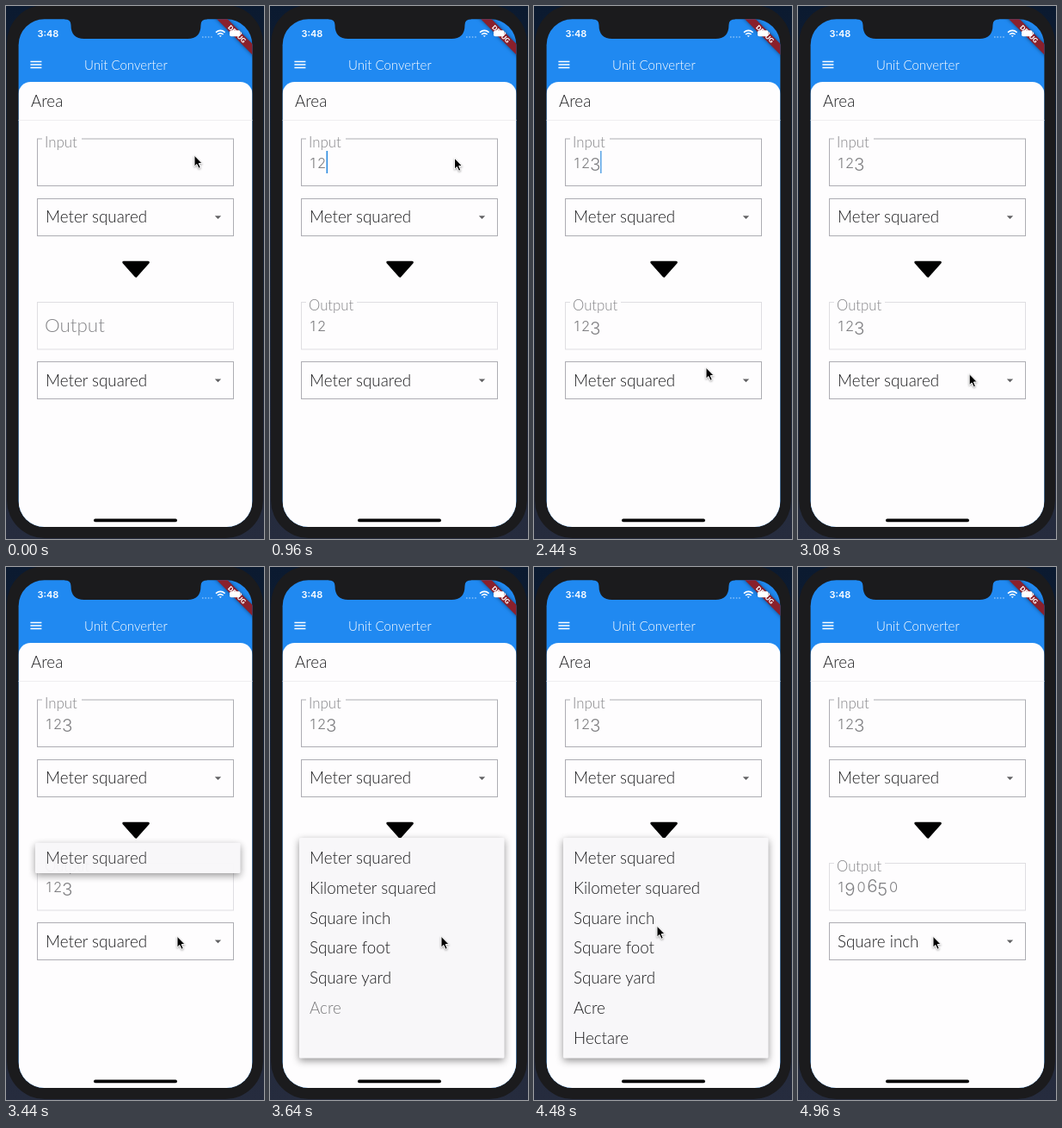
An HTML page for the animation above (5000 ms loop, 300 px wide and 618 px high).

```html
<!DOCTYPE html>
<html lang="en">
<head>
<meta charset="utf-8">
<title>Unit Converter</title>
<style>
  html, body { margin: 0; width: 100%; height: 100%; overflow: hidden; background: #0b1a30; }
  svg { display: block; }
  text { font-family: Lato, "Open Sans", sans-serif; font-weight: 300; white-space: pre; }
  .body { font-size: 18.8px; fill: #1c1c1e; }
  .label { font-size: 16.8px; fill: #858588; }
  .digits { font-family: Inter, sans-serif; fill: #808083; text-anchor: middle; }
  .box { fill: none; stroke: #adadb3; }
  .drop { fill: #626264; }
  #menu { filter: drop-shadow(0 3px 4px rgba(0, 0, 0, .42)); }
</style>
</head>
<body>
<svg width="300" height="618" viewBox="0 0 300 618">
  <defs>
    <clipPath id="screen"><rect x="14.6" y="15.2" width="271.8" height="588.8" rx="30"/></clipPath>
    <linearGradient id="desk" x2="0" y2="1">
      <stop stop-color="#0b1a30"/><stop offset="1" stop-color="#262c3e"/>
    </linearGradient>
  </defs>
  <rect width="300" height="618" fill="url(#desk)"/>
  <rect x="1" y="-1" width="298" height="618" rx="44" fill="#1b1b1d"/>

  <g clip-path="url(#screen)">
    <rect x="14" y="15" width="273" height="589" fill="#2089f1"/>
    <rect x="14.6" y="88" width="271.8" height="540" rx="14" fill="#fefdfe"/>
    <path d="M14 132.5H287" stroke="#efeef0"/>
    <path d="M28.4 64.4h13M28.4 68h13M28.4 71.6h13" stroke="#fff" stroke-width="1.5"/>
    <text x="91" y="73.5" font-size="15" fill="#fff">Unit Converter</text>
    <text class="body" x="29" y="117">Area</text>

    <rect class="box" x="36.5" y="154" width="228" height="54.5"/>
    <rect x="42" y="150" width="46" height="8" fill="#fefdfe"/>
    <text class="label" x="45" y="163.5">Input</text>
    <text class="digits" id="input"></text>
    <rect id="caret" y="168" width="1.6" height="26" fill="#2c8be0"/>

    <rect class="box" x="36.5" y="223.5" width="228" height="43"/>
    <text class="body" x="46" y="251">Meter squared</text>
    <path class="drop" d="M242.8 243.3h7.4l-3.7 3.7z"/>

    <path d="M136.8 297.2h28.6l-14.3 16z" stroke="#000" stroke-width="3" stroke-linejoin="round"/>

    <rect class="box" x="36.5" y="343.5" width="228" height="54.5" style="stroke:#dfdee2"/>
    <rect id="gap" x="42" y="340" height="8" fill="#fefdfe"/>
    <text class="label" id="outLabel" x="45">Output</text>
    <text class="digits" id="output"></text>

    <rect class="box" x="36.5" y="412.5" width="228" height="43"/>
    <text class="body" id="unit" x="46" y="440.5"></text>
    <path class="drop" d="M242.8 432.5h7.4l-3.7 3.7z"/>

    <g id="menu">
      <rect id="panel" x="34" width="238.5" rx="1.5" fill="#f8f7f9"/>
      <g id="items"></g>
    </g>

    <rect x="102" y="594.6" width="97" height="3.6" rx="1.8"/>

    <path d="M235 5L296 66V53.6L247.4 5z" fill="#8a202c" style="filter:drop-shadow(0 0 2px rgba(0,0,0,.5))"/>
    <text transform="translate(268.6 32.4) rotate(45)" y="2.7" font-size="7.4" style="font-weight:900"
      fill="#fff" text-anchor="middle">DEBUG</text>
    <rect x="260" y="28.2" width="12.6" height="7" rx="2" fill="#fff"/>
    <path d="M273.6 30.4v2.6" stroke="#fff"/>
  </g>

  <path d="M68 14V15.2Q75.5 15.2 75.5 22Q75.5 38 91 38H211Q226.5 38 226.5 22Q226.5 15.2 234 15.2V14z" fill="#1b1b1d"/>
  <text x="36.5" y="36.2" style="font:600 11px Inter,sans-serif" fill="#fff">3:48</text>
  <path d="M228 36h12" stroke="#fff" stroke-opacity=".45" stroke-width="1.5" stroke-dasharray="1.6 1.8"/>
  <g fill="none" stroke="#fff" stroke-width="1.6">
    <path d="M244 30.6Q249.3 26.2 254.6 30.6M246 33Q249.3 30.2 252.6 33"/>
    <path d="M247.7 34.2h3.2l-1.6 1.7z" fill="#fff" stroke="none"/>
  </g>

  <path id="mouse" d="M0-.8V12.2l2.9-2.7 2.2 4.8 2.2-1-2.1-4.7H9.2z" stroke="#fff"
    style="filter:drop-shadow(0 1px 1px rgba(0,0,0,.35))"/>
</svg>
<script>
const $ = id => document.getElementById(id);
const set = (el, attrs) => { for (const k in attrs) el.setAttribute(k, attrs[k]); };
const clamp = v => Math.min(1, Math.max(0, v));
const ramp = (t, from, length) => clamp((t - from) / length);
const ease = p => p * p * (3 - 2 * p);
const mix = (a, b, p) => a + (b - a) * p;

const LOOP = 5000, OPEN = 3370, PICK = 4520, MENU_MS = 300;
const KEYS = [560, 880, 1320];
const UNITS = ['Meter squared', 'Kilometer squared', 'Square inch', 'Square foot', 'Square yard', 'Acre', 'Hectare'];
const ADVANCE = { 0: 14, 1: 9.5, 2: 11, 3: 11.5, 5: 11.5, 6: 12, 9: 12 };

// Pointer stops: time, x, y
const POINTER = [
  [0, 219, 174], [520, 219, 174], [900, 214.5, 177], [1640, 214.5, 177], [1800, 216, 181.5], [1860, 216, 181.5],
  [2150, 200, 420], [2760, 200, 420], [3200, 199, 429], [3880, 199, 429], [4060, 143, 417],
  [4600, 143, 417], [4840, 157, 429], [LOOP, 157, 429]
];

const items = UNITS.map((name, i) => {
  const el = document.createElementNS('http://www.w3.org/2000/svg', 'text');
  el.textContent = name;
  set(el, { class: 'body', x: 46, y: 344 + 34.75 * i });
  $('items').append(el);
  return el;
});

// Old-style figures: 0-2 at x-height, 3, 5 and 9 hanging below the baseline
function writeDigits(el, digits, base) {
  let x = 45;
  const spans = [...digits].map(d => {
    const y = base + ('359'.includes(d) ? 3.6 : 0);
    const size = d < 3 ? 16.5 : 20.5;
    const span = `<tspan x="${x + ADVANCE[d] / 2}" y="${y}" font-size="${size}">${d}</tspan>`;
    x += ADVANCE[d];
    return span;
  });
  if (el.dataset.value !== digits) {
    el.dataset.value = digits;
    el.innerHTML = spans.join('');
  }
  return x;
}

function caretOpacity(t) {
  if (t < 320 || t >= OPEN) return 0;
  const fade = 1 - (1 - ramp((t - 320) % 500, 0, 250)) ** 2;
  if (t < 500) return fade;
  if (t < 1820) return 1;
  return Math.floor((t - 320) / 500) % 2 ? 1 - fade : fade;
}

function drawMenu(t) {
  const p = ramp(t, OPEN, MENU_MS);
  const opacity = clamp(p / .25) * (1 - ramp(t, PICK, 75));
  const grow = ease(ramp(p, .25, .25));
  const top = mix(319.8, 314, grow), bottom = mix(355, 569.5, grow);
  $('menu').style.opacity = opacity;
  set($('panel'), { y: top, height: bottom - top });
  const step = .5 / (UNITS.length + 1.5);
  items.forEach((el, i) => set(el, { opacity: i ? ramp(p, .5 + (i + 1) * step, 1.5 * step) : 1 }));
}

function movePointer(t) {
  const i = POINTER.findIndex(stop => stop[0] > t);
  const [t0, x0, y0] = POINTER[i - 1], [t1, x1, y1] = POINTER[i];
  const p = ease((t - t0) / (t1 - t0));
  set($('mouse'), { transform: `translate(${mix(x0, x1, p)} ${mix(y0, y1, p)})` });
}

function draw(now) {
  const t = now % LOOP;
  const typed = '123'.slice(0, KEYS.filter(k => t >= k).length);
  const picked = t >= PICK;

  set($('caret'), { x: writeDigits($('input'), typed, 187.7), opacity: caretOpacity(t) });
  writeDigits($('output'), picked ? '190650' : typed, 377.2);
  $('unit').textContent = UNITS[picked ? 2 : 0];

  const float = ease(ramp(t, KEYS[0], 200));
  $('outLabel').style.fontSize = mix(22.4, 16.8, float) + 'px';
  set($('outLabel'), { y: mix(378, 353, float) });
  set($('gap'), { width: 59 * float });

  drawMenu(t);
  movePointer(t);
  requestAnimationFrame(draw);
}
draw(0);
</script>
</body>
</html>
```
